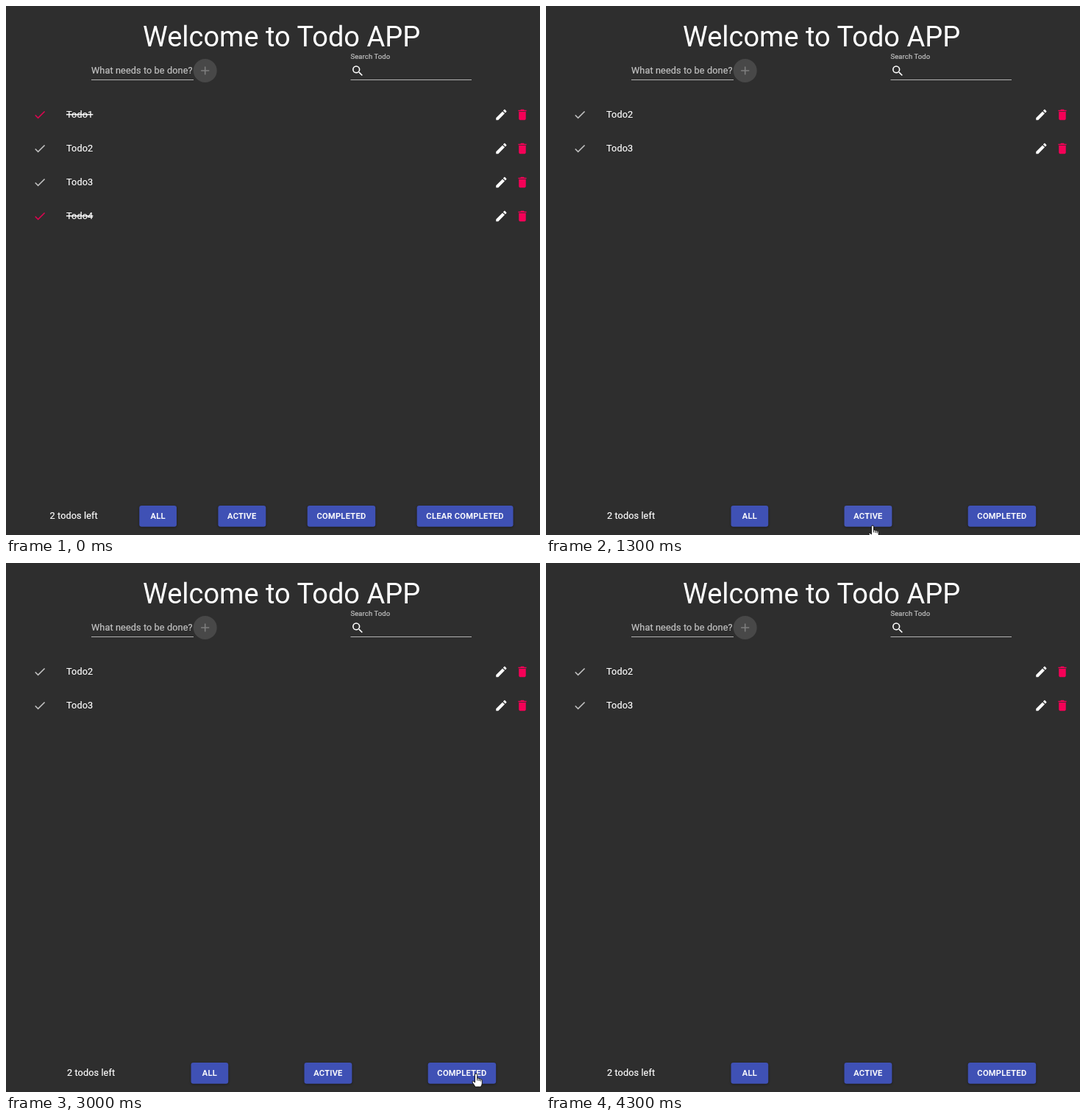
Write an HTML page that moves like this. It is 726 px wide and 720 px high and loops after 4700 ms.

```html
<!DOCTYPE html>
<html lang="en">
<head>
<meta charset="utf-8">
<title>Todo App</title>
<style>
  html, body { margin: 0; width: 100%; height: 100%; overflow: hidden; background: #2e2e2e; }
  svg { display: block; }
  text { font: 12.67px Roboto, sans-serif; letter-spacing: .00938em; fill: #fff; stroke: #fff; stroke-width: .2; }
  .title { font-size: 38px; letter-spacing: 0; stroke: none; }
  .hint { fill: #c4c4c4; stroke: #c4c4c4; }
  .small { font-size: 9.5px; }
  .done { text-decoration: line-through; }
  .label { font-size: 11.08px; font-weight: 500; letter-spacing: .02857em; }
  .raised { filter: drop-shadow(0 1.6px 1.4px rgba(0, 0, 0, .4)); }
</style>
</head>
<body>
<svg id="stage" width="726" height="720" viewBox="0 0 726 720"></svg>
<script>
const LOOP = 4700, STEP = 100;
const SCALE = .792;
const FOOTER = { left: 31.3, right: 717.8, top: 680, height: 28.7 };

const ICONS = {
  check: 'M9 16.2L4.8 12l-1.4 1.4L9 19 21 7l-1.4-1.4L9 16.2z',
  plus: 'M19 13h-6v6h-2v-6H5v-2h6V5h2v6h6v2z',
  pencil: 'M3 17.25V21h3.75L17.81 9.94l-3.75-3.75L3 17.25zM20.71 7.04c.39-.39.39-1.02 0-1.41l-2.34-2.34' +
    'c-.39-.39-1.02-.39-1.41 0l-1.83 1.83 3.75 3.75 1.83-1.83z',
  bin: 'M6 19c0 1.1.9 2 2 2h8c1.1 0 2-.9 2-2V7H6v12zM19 4h-3.5l-1-1h-5l-1 1H5v2h14V4z',
  lens: 'M15.5 14h-.79l-.28-.27a6.5 6.5 0 1 0-.7.7l.27.28v.79l5 4.99L20.49 19zm-6 0a4.5 4.5 0 1 1 0-9 4.5 4.5 0 0 1 0 9z'
};

const TODOS = [1, 2, 3, 4].map(id => ({ id, done: id === 1 || id === 4 }));

// Which button is pressed when; the list follows one step later.
const PRESSES = [
  { at: 600, label: 'ALL', keep: () => true },
  { at: 900, label: 'ACTIVE', keep: todo => !todo.done },
  { at: 2000, label: 'COMPLETED', keep: todo => todo.done },
  { at: 2900, label: 'CLEAR COMPLETED', keep: todo => !todo.done }
];

// Key points of the pointer: time and tip.
const PATH = [
  [100, 330, 430], [300, 217, 689], [600, 219, 688], [900, 324, 694], [1000, 326, 695], [1300, 444, 707],
  [1700, 604, 703], [2000, 616, 700], [2500, 638, 695], [3400, 640, 695], [3900, 656, 704], [4250, 682, 0]
];

const clamp = v => Math.max(0, Math.min(1, v));
const ease = v => 1 - (1 - clamp(v)) ** 2;
const mix = (a, b, k) => a + (b - a) * k;

const stage = document.getElementById('stage');
const widths = {};

const text = (x, y, words, cls = '') => `<text x="${x}" y="${y}" class="${cls}">${words}</text>`;
const icon = (name, x, y, fill) =>
  `<path d="${ICONS[name]}" fill="${fill}" transform="translate(${x} ${y}) scale(${SCALE}) translate(-12 -12)"/>`;
const rule = (x, width) => `<rect x="${x}" y="100" width="${width}" height="1" fill="#b2b2b2"/>`;

function textWidth(words, cls = '') {
  if (!(words in widths)) {
    stage.innerHTML = text(0, 0, words, cls);
    widths[words] = stage.firstChild.getComputedTextLength();
  }
  return widths[words];
}

function visibleTodos(time) {
  const past = PRESSES.filter(press => time > press.at);
  return past.length ? TODOS.filter(past[past.length - 1].keep) : TODOS;
}

// Spreads the counter and the buttons with equal space around each.
function footerItems(time) {
  const todos = visibleTodos(time);
  const left = todos.filter(todo => !todo.done).length;
  const count = `${left} todo${left ? 's' : ''} left`;
  const labels = PRESSES.map(press => press.label).slice(0, todos.some(todo => todo.done) ? 4 : 3);
  const items = [
    { label: count, width: textWidth(count) },
    ...labels.map(label => ({ label, width: Math.max(64 * SCALE, textWidth(label, 'label') + 32 * SCALE) }))
  ];
  const used = items.reduce((sum, item) => sum + item.width, 0);
  const gap = (FOOTER.right - FOOTER.left - used) / items.length;
  let x = FOOTER.left + gap / 2;
  for (const item of items) {
    item.x = x;
    x += item.width + gap;
  }
  return items;
}

function pointerAt(time) {
  const next = PATH.findIndex(point => point[0] >= time);
  if (next < 0 || time < PATH[0][0]) return null;
  const [from, to] = [PATH[Math.max(0, next - 1)], PATH[next]];
  const k = from === to ? 0 : (time - from[0]) / (to[0] - from[0]);
  return { x: mix(from[1], to[1], k), y: mix(from[2], to[2], k) };
}

function hoveredButton(time) {
  const tip = pointerAt(time);
  if (!tip || tip.y < FOOTER.top || tip.y > FOOTER.top + FOOTER.height) return null;
  return footerItems(time).slice(1).find(item => tip.x > item.x && tip.x < item.x + item.width);
}

function hoverLevel(label, time) {
  let level = 0;
  for (let t = 0; t < time; t += STEP) {
    const over = hoveredButton(t);
    level = clamp(level + (over && over.label === label ? .4 : -.4));
  }
  return level;
}

function ripple({ label, width }, time) {
  const { at } = PRESSES.find(press => press.label === label);
  const age = time - at;
  if (age < 0 || age > 550) return '';
  const tip = pointerAt(at);
  const start = footerItems(at).find(item => item.label === label).x;
  const radius = mix(3, width, ease(age / 550));
  const alpha = .3 * (1 - ease((age - 100) / 450));
  return `<circle cx="${tip.x - start}" cy="${tip.y - FOOTER.top}" r="${radius}" fill="#fff" opacity="${alpha}"/>`;
}

function button(item, time) {
  const { x, width, label } = item;
  const box = `x="${x}" y="${FOOTER.top}" width="${width}" height="${FOOTER.height}"`;
  const hover = hoverLevel(label, time);
  const fill = [[63, 48], [81, 63], [181, 159]].map(([a, b]) => Math.round(mix(a, b, hover)));
  const labelX = x + (width - textWidth(label, 'label')) / 2;
  return `<rect class="raised" ${box} rx="3.2" fill="rgb(${fill})"/>` +
    text(labelX, 698, label, 'label') + `<svg ${box}>${ripple(item, time)}</svg>`;
}

function footer(time) {
  const [count, ...buttons] = footerItems(time);
  return text(count.x, 698.3, count.label) + buttons.map(item => button(item, time)).join('');
}

function header() {
  return text(186, 54.5, 'Welcome to Todo APP', 'title') +
    text(116, 92, 'What needs to be done?', 'hint') + rule(116, 139) +
    '<circle cx="270.7" cy="88" r="16" fill="#484848"/>' + icon('plus', 270.7, 88, '#7e7e7e') +
    text(468.5, 71.5, 'Search Todo', 'hint small') + rule(468.5, 164.5) +
    icon('lens', 478.2, 88.4, '#fff');
}

function todoRow({ id, done }, row) {
  const y = 148 + row * 46;
  return icon('check', 46, y, done ? '#dc0550' : '#c1c1c1') +
    text(82, y + 3.7, 'Todo' + id, done ? 'done' : '') +
    icon('pencil', 673.4, y, '#fff') + icon('bin', 702, y, '#f50057');
}

function pointer(time) {
  const tip = pointerAt(time);
  if (!tip) return '';
  const shape = hoveredButton(time)
    ? '<path d="M-1.6 1.6a1.6 1.6 0 0 1 3.2 0V6.4c.8-.6 2-.4 2.4.6 .8-.5 1.9-.2 2.2.7 1-.4 2 .3 2 1.4V13' +
      'c0 2-1.2 3-1.6 5H-1.4c-.4-2-2.6-4-3.6-6.2-.6-1.3.9-2.2 1.9-1.2L-1.6 12z"/>' +
      '<path d="M1.6 6.4V9.5M4 7v3M6.2 8v2.5" fill="none"/>'
    : '<path d="M0 0V16l3.7-3.5 2.4 5.6 2.4-1-2.4-5.5H11.4z"/>';
  return `<g transform="translate(${tip.x} ${tip.y})" fill="#fff" stroke="#000" stroke-width=".9">${shape}</g>`;
}

function draw(time) {
  stage.innerHTML = header() + visibleTodos(time).map(todoRow).join('') + footer(time) + pointer(time);
}

// The screen advances in tenths of a second.
let drawn = -1;
function tick() {
  const time = Math.floor(performance.now() % LOOP / STEP) * STEP;
  if (time !== drawn) draw(drawn = time);
  requestAnimationFrame(tick);
}
tick();
</script>
</body>
</html>
```
